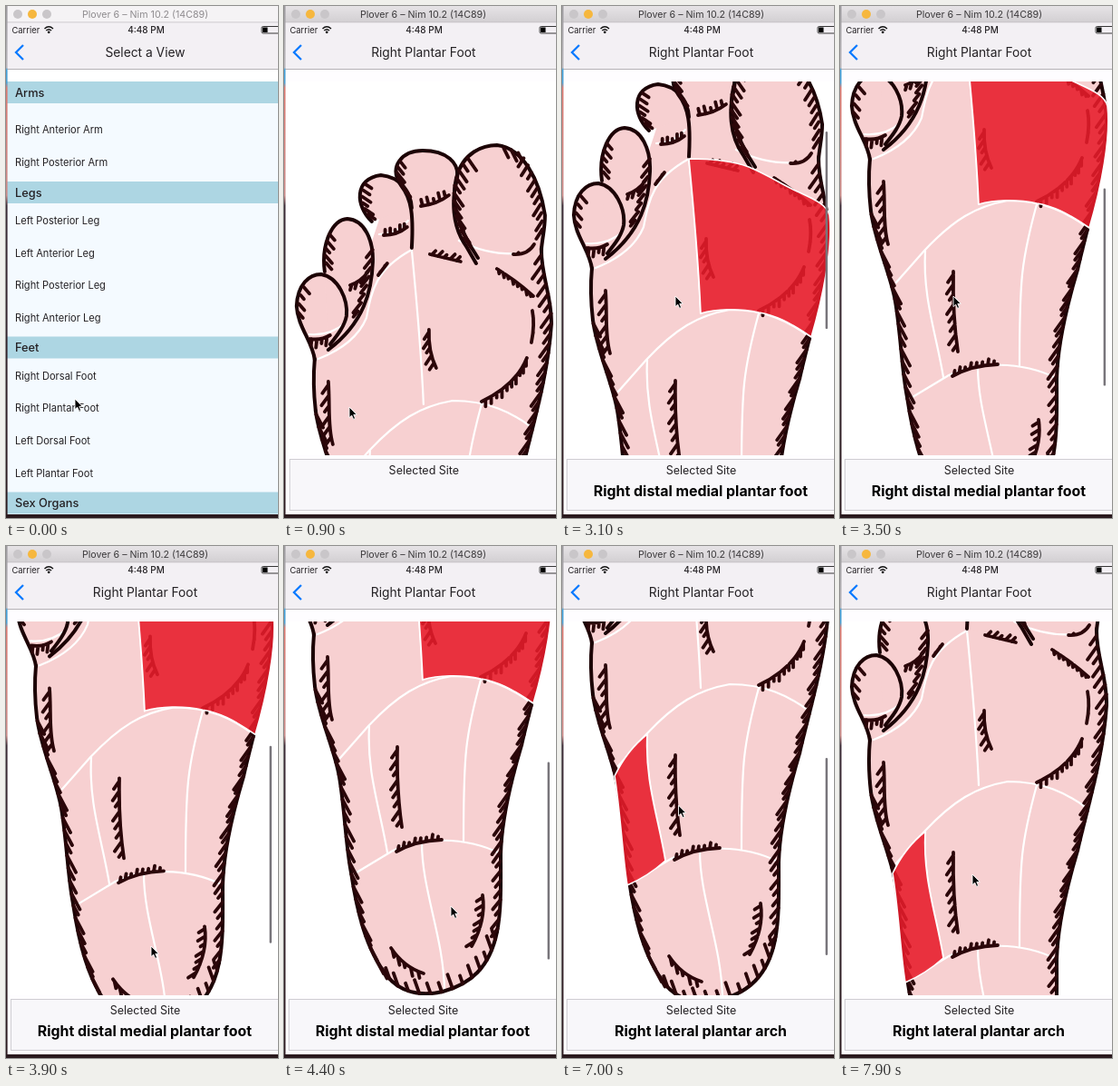
Recreate the animation shown at these times as an HTML page. Size 300x563 px, loop 8 s.

```html
<!DOCTYPE html>
<html lang="en">
<head>
<meta charset="utf-8">
<title>Select a View</title>
<style>
  html, body { margin: 0; width: 100%; height: 100%; overflow: hidden; background: #fff; }
  #stage { display: block; width: 300px; height: 563px; font-family: Inter, Roboto, sans-serif; }
  text { fill: #242124; }
  .mid { text-anchor: middle; }
  .row { font-size: 11.1px; }
  .head { font-size: 12.8px; font-weight: 500; }
  .title { font-size: 13.8px; }
  .skin { fill: #f7d0d1; }
  .ink { fill: none; stroke: #1c0305; stroke-width: 4; stroke-linecap: round; stroke-linejoin: round; }
  .hatch { fill: none; stroke: #2b0609; stroke-width: 3.8; stroke-linecap: round; }
  .seam { fill: none; stroke: #fff; stroke-width: 2.2; stroke-linecap: round; }
  .region { fill: #e81c2b; fill-opacity: .88; stroke: #fff; stroke-width: 1.6; display: none; }
</style>
</head>
<body>
<svg id="stage" viewBox="0 0 300 563">
  <defs>
    <linearGradient id="edge" x2="0" y2="1">
      <stop offset="0" stop-color="#9c9a9e"/>
      <stop offset=".12" stop-color="#b7b4b8"/>
      <stop offset=".125" stop-color="#3f9fd8"/>
      <stop offset=".15" stop-color="#4d9fd0"/>
      <stop offset=".16" stop-color="#d9786f"/>
      <stop offset=".37" stop-color="#c98a88"/>
      <stop offset=".39" stop-color="#3a2a35"/>
      <stop offset="1" stop-color="#2c1a1f"/>
    </linearGradient>
    <linearGradient id="bar" x2="0" y2="1">
      <stop offset="0" stop-color="#e6e3e6"/>
      <stop offset="1" stop-color="#d2cfd2"/>
    </linearGradient>
  </defs>
  <rect width="300" height="563" fill="#fff"/>

  <g id="list">
    <rect y="69" width="300" height="490" fill="#f4faff"/>
    <rect y="69" width="300" height="14" fill="#fff"/>
    <rect id="pressed" y="424" width="300" height="36" fill="#d9d9d9"/>
  </g>

  <g id="page">
    <rect y="69" width="300" height="490" fill="#fefdff"/>
    <svg y="83" width="300" height="411" viewBox="0 83 300 411">
      <rect y="83" width="300" height="411" fill="#fff"/>
      <g id="foot"></g>
    </svg>
    <rect id="thumb" x="290.6" width="2.4" height="217" rx="1.2" fill="#77747a"/>
    <rect x="5.5" y="498.5" width="310" height="56" fill="#f8f7fa" stroke="#cfcdd2"/>
    <text class="mid" x="153.5" y="515" font-size="12.5">Selected Site</text>
    <text class="mid" id="site" x="153" y="539" font-size="15.9" font-weight="700" style="fill:#000"></text>
  </g>

  <rect y="18" width="300" height="51" fill="#f3f0f4"/>
  <rect y="69" width="300" height="1" fill="#b5b2b6"/>
  <text class="mid title" id="listTitle" x="153.5" y="56">Select a View</text>
  <text class="mid title" id="pageTitle" x="153.5" y="56">Right Plantar Foot</text>
  <path d="M19 43 L11 51 L19 59" fill="none" stroke="#0a7aff" stroke-width="2.3"/>

  <text x="6.5" y="30" font-size="9.4">Carrier</text>
  <g fill="none" stroke="#111" stroke-width="1.4">
    <path d="M42.5 25 Q47.2 20.6 52 25 M44.3 27 Q47.2 24.4 50.1 27"/>
    <circle cx="47.2" cy="28.8" r=".7" fill="#111"/>
  </g>
  <text class="mid" x="154.5" y="30" font-size="10" font-weight="500">4:48 PM</text>
  <rect x="282" y="22.5" width="22" height="7.5" rx="1.5" fill="none" stroke="#222" stroke-width=".9"/>
  <rect x="283" y="23.5" width="5.5" height="5.5" fill="#000"/>

  <rect id="barFill" width="300" height="18" fill="url(#bar)"/>
  <rect y="17.5" width="300" height=".8" fill="#c3c0c3"/>
  <circle cx="13" cy="9" r="5" fill="#c9c6c9"/>
  <circle cx="29" cy="9" r="5" fill="#f6b73e"/>
  <circle cx="45" cy="9" r="5" fill="#c9c6c9"/>
  <text class="mid" id="barText" x="153.5" y="13" font-size="10.7">Plover 6 – Nim 10.2 (14C89)</text>

  <rect width="1.6" height="563" fill="url(#edge)"/>
  <rect y="559" width="300" height="4" fill="#2a1a1e"/>

  <path id="cursor" d="M0 0 V11.6 L2.7 9.2 L4.6 13.4 L6.6 12.5 L4.8 8.4 H8.3 Z"
        fill="#000" stroke="#fff" stroke-width=".9"/>
</svg>

<script>
const $ = id => document.getElementById(id);

function add(parent, tag, attrs, content = '') {
  const el = document.createElementNS('http://www.w3.org/2000/svg', tag);
  for (const key in attrs) el.setAttribute(key, attrs[key]);
  el.textContent = content;
  return parent.appendChild(el);
}

// The list of views
const sections = [
  [83, 'Arms', 140, ['Right Anterior Arm', 'Right Posterior Arm']],
  [193, 'Legs', 240, ['Left Posterior Leg', 'Left Anterior Leg', 'Right Posterior Leg', 'Right Anterior Leg']],
  [363.5, 'Feet', 410.5, ['Right Dorsal Foot', 'Right Plantar Foot', 'Left Dorsal Foot', 'Left Plantar Foot']],
  [534.5, 'Sex Organs', 0, []]
];
for (const [y, name, first, rows] of sections) {
  add($('list'), 'rect', { y, width: 300, height: 24, fill: '#add6e3' });
  add($('list'), 'text', { class: 'head', x: 10, y: y + 16.7 }, name);
  rows.forEach((row, i) => add($('list'), 'text', { class: 'row', x: 10, y: first + i * 35.7 }, row));
}

// The foot, in page coordinates before scrolling
const foot = $('foot');
const leftBall = 'M33 388 C31 410 32 428 34 445';
const leftSide = 'M34 445 C38 478 56 515 61 545 C67 580 68 620 74 650 C80 690 90 735 114 764';
const heel = 'M114 764 C127 781 150 787 175 781 C205 773 227 755 235 715';
const rightHeel = 'M235 715 C240 690 239 660 239 630';
const rightSide = 'M239 630 C240 590 250 550 262 510 C272 465 290 410 294 350 C295 320 282 295 283 266';
const toes = [
  'M33 389 C31 370 14 352 13 330 C14 306 27 295 40 295 C59 298 70 323 68 341 C66 352 58 362 50 372',
  'M44 292 C40 262 52 235 69 234 C88 235 98 258 97 282 C96 312 88 348 48 378',
  'M96 237 C78 220 76 190 106 186 C128 188 139 205 140 222',
  'M140 266 C142 230 140 212 128 197 C114 176 130 159 152 159 C178 159 193 172 190 190 C184 212 184 242 200 264 L211 283',
  'M213 277 C195 250 182 218 189 190 C196 160 220 153 234 153 C262 156 281 190 287 230 C287 245 284 255 283 268'
];
const join = (...parts) => parts[0] + parts.slice(1).map(p => p.replace(/^M\S+ \S+/, '')).join('');

add(foot, 'path', {
  class: 'skin',
  d: join(leftBall, leftSide, heel, rightHeel, rightSide) + ' L190 225 L165 200 L138 210 L105 232 L94 265 L65 325 Z'
});
toes.forEach(d => add(foot, 'path', { class: 'skin', d }));

const seams = [
  'M37 388 Q78 372 90 343 C96 312 100 290 140 268',
  'M140 268 C146 330 151 390 153 438',
  'M62 524 L93 489 C125 455 150 440 185 434 C225 434 250 447 272 463',
  'M217 438 C200 500 198 520 198 615',
  'M94 489 C91 540 106 580 114 628',
  'M80 650 Q100 638 120 626 C150 611 200 610 238 629',
  'M152 617 C152 670 176 720 177 780',
  'M27 361 Q50 363 67 348',
  'M104 251 Q124 250 136 236',
  'M192 258 Q225 275 262 272'
];
seams.forEach(d => add(foot, 'path', { class: 'seam', d }));

[leftBall, leftSide, heel, rightHeel, rightSide, ...toes].forEach(d => add(foot, 'path', { class: 'ink', d }));

// [spine, strokes, dx, dy, is the spine drawn]
const hatches = [
  [leftSide, 24, 9, 17],
  [heel, 13, -5, -14],
  [rightHeel, 8, -8, 10],
  [rightSide, 34, -10, 14],
  ['M262 165 C276 185 285 215 284 252', 10, -7, 11],
  ['M239 156 Q255 158 262 165', 3, 6, 12],
  ['M199 257 C187 232 183 212 190 186 Q196 170 206 163', 12, 9, 13],
  ['M133 203 Q116 182 130 167', 6, 8, 10],
  ['M93 231 Q78 210 92 192', 6, 9, 6],
  ['M46 285 Q42 262 52 246', 5, 7, 8],
  ['M97 265 Q96 300 78 342', 8, -8, 10],
  ['M15 340 Q14 320 24 303', 4, 6, 7],
  ['M28 366 Q40 368 50 362', 4, -1, 9, 1],
  ['M72 307 Q84 303 92 292', 4, -2, 7, 1],
  ['M109 252 Q124 252 135 243', 5, 0, -7, 1],
  ['M150 220 Q168 218 181 208', 5, -2, -8, 1],
  ['M160 273 L194 281', 5, 5, -5, 1],
  ['M103 296 L113 283', 2, 1, -2, 1],
  ['M252 273 Q268 274 275 262', 2, 2, -2, 1],
  ['M273 335 Q276 350 272 370', 2, 0, 2, 1],
  ['M234 289 Q255 302 274 319', 8, 1, 5, 1],
  ['M267 387 Q255 417 217 435', 10, 0, 8, 1],
  ['M159 356 Q158 380 167 398', 5, -6, 9, 1],
  ['M48 413 C50 440 47 462 53 482', 6, -8, 11, 1],
  ['M125 512 Q124 560 130 600', 8, -7, 10, 1],
  ['M124 627 Q145 615 174 614', 8, 1, -6, 1],
  ['M219 675 C222 695 216 715 207 731', 7, -8, 5, 1],
  ['M118 733 Q132 754 154 761', 5, 2, 9, 1]
];
for (const [d, count, dx, dy, drawn] of hatches) {
  const spine = add(foot, 'path', { class: 'hatch', d });
  const length = spine.getTotalLength();
  let strokes = drawn ? d : '';
  for (let i = 0; i < count; i++) {
    const { x, y } = spine.getPointAtLength(length * (i + .3) / count);
    const k = .85 + .25 * Math.sin(i * 2.4);
    strokes += `M${x} ${y} l${dx * k} ${dy * k}`;
  }
  spine.setAttribute('d', strokes);
}

const regions = {
  'Right distal medial plantar foot': 'M140 268 C165 268 190 271 206 277 C230 287 245 298 262 305 C277 312 292 318 295 330 C299 365 288 420 275 464 C250 447 235 440 217 437 C195 432 170 433 153 438 C151 390 146 330 140 268Z',
  'Right medial heel': 'M152 617 C175 613 215 618 240 633 C238 660 242 690 240 712 C230 750 205 775 177 782 C176 720 152 670 152 617Z',
  'Right lateral heel': 'M76 655 Q95 640 114 628 Q130 618 152 617 C152 670 176 720 177 782 C150 788 125 780 112 764 C92 735 82 690 76 655Z',
  'Right medial plantar arch': 'M217 438 C250 443 262 455 272 463 C255 530 240 570 239 630 Q215 616 198 615 C198 520 200 500 217 438Z',
  'Right middle plantar arch': 'M93 489 C130 450 160 430 217 438 C200 500 198 520 198 615 Q140 608 114 628 C106 580 90 540 93 489Z',
  'Right lateral plantar arch': 'M94 489 Q72 506 58 535 C64 570 67 625 72 655 Q95 645 114 628 C106 580 91 540 94 489Z'
};
for (const name in regions) regions[name] = add(foot, 'path', { class: 'region', d: regions[name] });

// Timeline: [time, value...]
const picks = [
  [0, ''],
  [2100, 'Right distal medial plantar foot'],
  [5500, 'Right medial heel'],
  [6000, 'Right lateral heel'],
  [6300, 'Right medial plantar arch'],
  [6500, 'Right middle plantar arch'],
  [6700, 'Right lateral plantar arch']
];
const scroll = [[0, 0], [2700, 0], [3000, 70], [3500, 220], [3800, 248], [4100, 274], [4400, 291],
  [4700, 298], [6900, 298], [7200, 250], [7500, 192], [7700, 175], [8000, 175]];
const thumbAlpha = [[0, 0], [2600, 0], [2700, 1], [4700, 1], [5000, 0], [6800, 0], [6900, 1], [7600, 1], [7900, 0]];
const pointer = [[0, 76, 432], [300, 72, 441], [1000, 72, 441], [1800, 205, 372], [2100, 205, 372],
  [2500, 125, 419], [2700, 125, 419], [3100, 125, 319], [3600, 125, 319], [3900, 160, 440], [4200, 184, 396],
  [4800, 184, 396], [5300, 205, 395], [5500, 205, 395], [5800, 135, 387], [6000, 135, 387],
  [6300, 218, 270], [6500, 150, 255], [6700, 88, 270], [6900, 125, 270], [7500, 146, 361], [8000, 146, 361]];

function sample(track, t) {
  const i = track.findIndex(key => key[0] > t);
  if (i < 0) return track[track.length - 1].slice(1);
  const [a, b] = [track[i - 1], track[i]];
  const k = (t - a[0]) / (b[0] - a[0]);
  return a.slice(1).map((v, j) => v + (b[j + 1] - v) * k);
}

const shift = (el, x, y = 0) => el.setAttribute('transform', `translate(${x} ${y})`);

function render(t) {
  const x = Math.min(1, Math.max(0, (t - 300) / 700));
  const rest = (1 - x) ** 3;
  shift($('page'), 300 * rest);
  shift($('list'), -90 * (1 - rest));
  shift($('pageTitle'), 110 * rest);
  shift($('listTitle'), -110 * (1 - rest));
  $('pageTitle').style.opacity = 1 - rest;
  $('listTitle').style.opacity = rest ** 2;
  $('pressed').style.opacity = t >= 200 ? 1 : 0;

  const active = t >= 100;
  $('barFill').setAttribute('fill', active ? 'url(#bar)' : '#f5f3f5');
  $('barText').style.fill = active ? '#3c3a3c' : '#8f8c8f';

  const [top] = sample(scroll, t);
  shift(foot, 0, -top);
  $('thumb').setAttribute('y', 86 + .521 * top);
  $('thumb').style.opacity = sample(thumbAlpha, t)[0];

  const picked = picks.filter(p => p[0] <= t).pop()[1];
  $('site').textContent = picked;
  for (const name in regions) regions[name].style.display = name === picked ? 'inline' : 'none';

  shift($('cursor'), ...sample(pointer, t));
}

const start = performance.now();
function tick() {
  const t = (performance.now() - start) % 8000;
  render(Math.floor(t / 100) * 100);
  requestAnimationFrame(tick);
}
tick();
</script>
</body>
</html>
```
